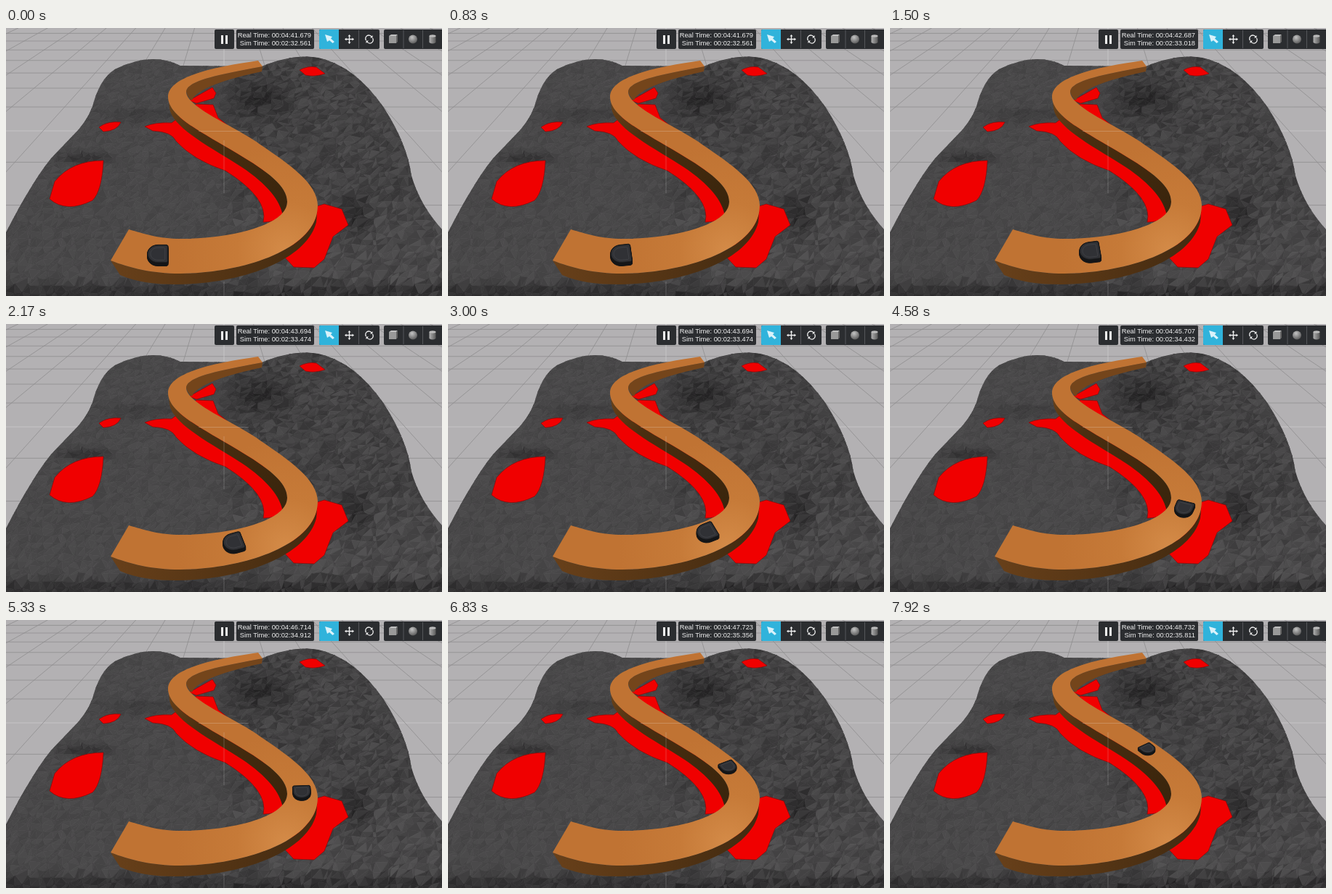
These frames come from a looping animation (600x370 px, 8 s). An HTML page with a canvas:

```html
<!DOCTYPE html>
<html lang="en">
<head>
<meta charset="utf-8">
<title>Lava track</title>
<style>
  html, body { margin: 0; width: 100%; height: 100%; overflow: hidden; background: #b3b1b3; }
  canvas, svg { position: absolute; left: 0; top: 0; width: 600px; height: 370px; display: block; }
  text { font: 9.3px "Liberation Sans", Arial, sans-serif; fill: #f2f2f2; text-anchor: end; }
  .lava { fill: #f00000; stroke: #8d0808; stroke-width: .7; stroke-linejoin: round; }
  .bar { fill: #2b2d30; }
  .icon { fill: none; stroke: #f0f0f0; stroke-width: 1.3; }
  .light { fill: #f0f0f0; }
</style>
</head>
<body>
<canvas id="ground" width="600" height="370"></canvas>
<svg viewBox="0 0 600 370">
  <defs>
    <radialGradient id="wood" gradientUnits="userSpaceOnUse" cx="385" cy="308" r="150">
      <stop offset="0" stop-color="#d48b48"/><stop offset=".45" stop-color="#c67a38"/><stop offset="1" stop-color="#c07333"/>
    </radialGradient>
    <linearGradient id="front">
      <stop offset="0" stop-color="#68401a"/><stop offset="1" stop-color="#422a10"/>
    </linearGradient>
    <linearGradient id="inner" x2="1" y2="1">
      <stop offset="0" stop-color="#6b4219"/><stop offset=".3" stop-color="#4a2e10"/><stop offset="1" stop-color="#38240c"/>
    </linearGradient>
    <radialGradient id="ball" cx=".4" cy=".3" r=".7">
      <stop offset="0" stop-color="#c4c4c4"/><stop offset="1" stop-color="#5d5d5d"/>
    </radialGradient>
    <linearGradient id="tube">
      <stop offset="0" stop-color="#b0b0b0"/><stop offset="1" stop-color="#5a5a5a"/>
    </linearGradient>
  </defs>

  <g class="lava">
    <path d="M404 58Q415 52 427 54L439 63Q425 68 412 65Z"/>
    <path d="M128 137Q140 128 158 130Q153 142 134 143Z"/>
    <path d="M60 236L67 212Q90 183 134 183Q132 225 119 238Q83 256 60 236Z"/>
    <path d="M252 100L284 82 289 90 286 97 262 104Z"/>
    <path d="M191 136Q205 130 228 131L262 105 285 106 292 124 322 148 386 240Q385 268 354 268Q362 235 302 197Q257 182 234 156Q228 143 202 142Z"/>
    <path d="M425 247L438 243 462 250 471 272 450 288 438 319 424 331 396 330 383 316Z"/>
  </g>

  <path fill="#74451b" d="M353 53C300 63 248 72 248 88Q250 96 256 100C261 84 305 70 352 60Z"/>
  <path fill="url(#inner)" d="M223 95C223 122 270 144 318 173C360 198 387 218 387 240Q386 254 381 262C380 240 358 213 318 188C280 164 227 136 225 110Z"/>
  <path fill="url(#front)" d="M144 321C170 331 200 339 240 339C330 338 429 304 429 245L427 268C415 318 330 353 235 354C205 354 180 351 157 341Z"/>
  <path fill="url(#wood)" d="M347 45C300 52 223 64 223 95C223 122 270 144 318 173C360 198 387 218 387 240C387 272 310 291 240 291C210 291 190 284 169 278L144 321C170 331 200 339 240 339C330 338 429 304 429 245C429 215 390 188 350 161C320 138 248 110 248 88C248 72 300 63 353 53Z"/>
  <path stroke="#eee" stroke-opacity=".22" d="M300 155V228M300 350V370M265 142.5H334"/>

  <g id="robot" stroke-linejoin="round">
    <path id="hull" fill="#141517" stroke="#141517"/>
    <path id="lid" fill="#303135" stroke="#1b1c1e" stroke-width=".8"/>
    <path id="rim" fill="none" stroke="#45474b" stroke-width=".7"/>
  </g>

  <g class="bar">
    <rect x="287" y="2" width="27" height="27" rx="2"/>
    <rect x="317" y="2" width="107" height="27" rx="2"/>
    <rect x="431" y="2" width="83" height="27" rx="2"/>
    <rect x="520" y="2" width="84" height="27" rx="2"/>
  </g>
  <path class="light" d="M296 10h3v12h-3zM302 10h3v12h-3z"/>
  <text id="real" x="420" y="13.300"></text>
  <text id="sim" x="420" y="24.300"></text>
  <path fill="#30b3db" d="M433 2H458V29H433Q431 29 431 27V4Q431 2 433 2Z"/>
  <path fill="#d9f2fa" d="M439 9L449 12 447 14.500 452 19 449.500 21 445 17 442 19Z"/>
  <path class="icon" d="M468 15.500H477M472.500 11V20"/>
  <path class="light" d="M472.500 9l2 2.500h-4zM472.500 22l2-2.500h-4zM466 15.500l2.500-2v4zM479 15.500l-2.500-2v4z"/>
  <path class="icon" d="M495.500 17A4.500 4.500 0 0 1 503 12M504.500 14A4.500 4.500 0 0 1 497 19"/>
  <path class="light" d="M504.500 10v3.500h-3.500zM495.500 21v-3.500h3.500z"/>
  <path stroke="#55565a" d="M485.500 3V28M547 3V28M573.500 3V28"/>
  <path fill="#c0c0c0" d="M527 11l3-2h9l-2 2z"/>
  <path fill="#999" d="M527 11h10v10h-10z"/>
  <path fill="#636363" d="M537 11l2-2v10l-2 2z"/>
  <circle cx="560" cy="15.500" r="6" fill="url(#ball)"/>
  <path fill="url(#tube)" d="M582.500 11V20Q587 23 591.500 20V11Z"/>
  <ellipse cx="587" cy="11" rx="4.500" ry="1.700" fill="#bbb"/>
</svg>
<script>
const $ = id => document.getElementById(id);
const ctx = $('ground').getContext('2d');
const horizon = -135;

function line(x1, y1, x2, y2, axis) {
  ctx.strokeStyle = axis ? '#cbc9cb' : '#8f8d8f';
  ctx.beginPath();
  ctx.moveTo(x1, y1);
  ctx.lineTo(x2, y2);
  ctx.stroke();
}

function drawGrid() {
  ctx.fillStyle = '#b3b1b3';
  ctx.fillRect(0, 0, 600, 370);
  ctx.lineWidth = .8;
  const axisDepth = 277, rows = 7.4, cell = 83;
  const columnX = (i, y) => 300 + cell * i * (y - horizon) / axisDepth;
  for (let n = -4; n <= 7; n++) {
    const y = horizon + axisDepth * rows / (rows + n);
    line(0, y, 600, y, n === 0);
  }
  for (let i = -8; i <= 8; i++)
    line(columnX(i, 0), 0, columnX(i, 370), 370, i === 0);
}

const hash = (i, j, k) => {
  const v = Math.sin(i * 127.1 + j * 311.7 + k * 74.7) * 43758.5453;
  return v - Math.floor(v);
};
const ramp = (a, b, v) => Math.min(1, Math.max(0, (v - a) / (b - a)));
const hollow = (x, y, cx, cy, rx, ry) => Math.exp(-(((x - cx) / rx) ** 2) - ((y - cy) / ry) ** 2);

const brightness = (x, y) => 72
  - 6 * ramp(290, 320, x) * ramp(260, 230, y)
  - 22 * hollow(x, y, 350, 98, 40, 26)
  - 28 * hollow(x, y, 482, 258, 20, 26)
  - 26 * hollow(x, y, 110, 180, 32, 7)
  - 12 * hollow(x, y, 190, 120, 60, 9)
  - 22 * ramp(346, 362, y);

function drawFacet(seed, ...corners) {
  const x = corners.reduce((sum, p) => sum + p[0], 0) / 3;
  const y = corners.reduce((sum, p) => sum + p[1], 0) / 3;
  const rough = 9 + 14 * ramp(290, 330, x) + 6 * ramp(340, 350, y);
  const v = brightness(x, y) + (seed - .5) * rough;
  ctx.fillStyle = ctx.strokeStyle = `rgb(${v},${v - 1},${v})`;
  ctx.beginPath();
  corners.forEach(p => ctx.lineTo(...p));
  ctx.closePath();
  ctx.fill();
  ctx.stroke();
}

function drawTerrain() {
  ctx.save();
  ctx.clip(new Path2D(`M0 370V282Q36 212 62 180L100 140Q117 120 122 98Q132 68 150 57
    Q200 32 240 52L352 53Q395 35 430 41Q480 52 520 110Q552 160 558 204Q570 245 600 278V370Z`));
  ctx.lineWidth = .6;
  const vertex = (i, j) => [
    i * 9 + (hash(i, j, 1) - .5) * 10,
    32 + j * 4.5 + j * j * .055 + (hash(i, j, 2) - .5) * 6
  ];
  for (let j = -1; j < 50; j++)
    for (let i = -1; i < 68; i++) {
      const right = vertex(i + 1, j), below = vertex(i, j + 1);
      drawFacet(hash(i, j, 3), vertex(i, j), right, below);
      drawFacet(hash(i, j, 4), right, vertex(i + 1, j + 1), below);
    }
  ctx.restore();
}

// Key points of the drive: time, x, y.
const route = [
  [0, 209, 314], [830, 238, 314], [2170, 313, 303], [3830, 390, 272],
  [5330, 407, 239], [6830, 386, 204], [7920, 354.5, 179]
];

// Smooth curve through the key points, axis 1 or 2.
function routeAt(t, axis) {
  const last = route.length - 1;
  const i = Math.max(0, route.findLastIndex((p, n) => n < last && p[0] <= t));
  const slope = n => {
    const a = route[Math.max(0, n - 1)], b = route[Math.min(last, n + 1)];
    return (b[axis] - a[axis]) / (b[0] - a[0]);
  };
  const [a, b] = [route[i], route[i + 1]], span = b[0] - a[0], u = (t - a[0]) / span;
  return a[axis] + (b[axis] - a[axis]) * u * u * (3 - 2 * u)
    + span * u * (1 - u) * ((1 - u) * slope(i) - u * slope(i + 1));
}

// Half round body: flat front towards +x, round back.
const body = [[14, -13], [14, 13], [12, 14.5]];
for (let a = Math.PI / 2; a < 4.8; a += Math.PI / 12)
  body.push([14.5 * Math.cos(a), 14.5 * Math.sin(a)]);
body.push([12, -14.5]);

function drawRobot(t) {
  const x = routeAt(t, 1), y = routeAt(t, 2);
  const size = (y - horizon) / (314 - horizon), tilt = .85 - (314 - y) * .0018, height = 4.5 * size;
  const heading = Math.atan2((routeAt(t + 20, 2) - routeAt(t - 20, 2)) / tilt, routeAt(t + 20, 1) - routeAt(t - 20, 1));
  const cos = Math.cos(heading) * size, sin = Math.sin(heading) * size;
  const ring = (scale, lift) => 'M' + body.map(([px, py]) =>
    (x + (px * cos - py * sin) * scale).toFixed(2) + ' ' +
    (y + (px * sin + py * cos) * scale * tilt - lift).toFixed(2)).join('L') + 'Z';
  let hull = '';
  for (let s = -.5; s <= .5; s += .25) hull += ring(1, s * height);
  $('hull').setAttribute('d', hull);
  $('lid').setAttribute('d', ring(.96, height / 2));
  $('rim').setAttribute('d', ring(.7, height / 2));
}

const readings = [
  '41.679 32.561', '42.687 33.018', '43.694 33.474', '44.700 33.953',
  '45.707 34.432', '46.714 34.912', '47.723 35.356', '48.732 35.811'
];

function drawClock(t) {
  const [real, sim] = readings[Math.min(7, Math.floor(t / 1007))].split(' ');
  $('real').textContent = 'Real Time: 00:04:' + real;
  $('sim').textContent = 'Sim Time: 00:02:' + sim;
}

const start = performance.now(), step = 1000 / 12;
function frame() {
  const elapsed = Math.max(0, performance.now() - start) % 8000;
  const t = Math.floor((elapsed + 4) / step) % 96 * step;
  drawRobot(t);
  drawClock(t);
  requestAnimationFrame(frame);
}

drawGrid();
drawTerrain();
frame();
</script>
</body>
</html>
```
